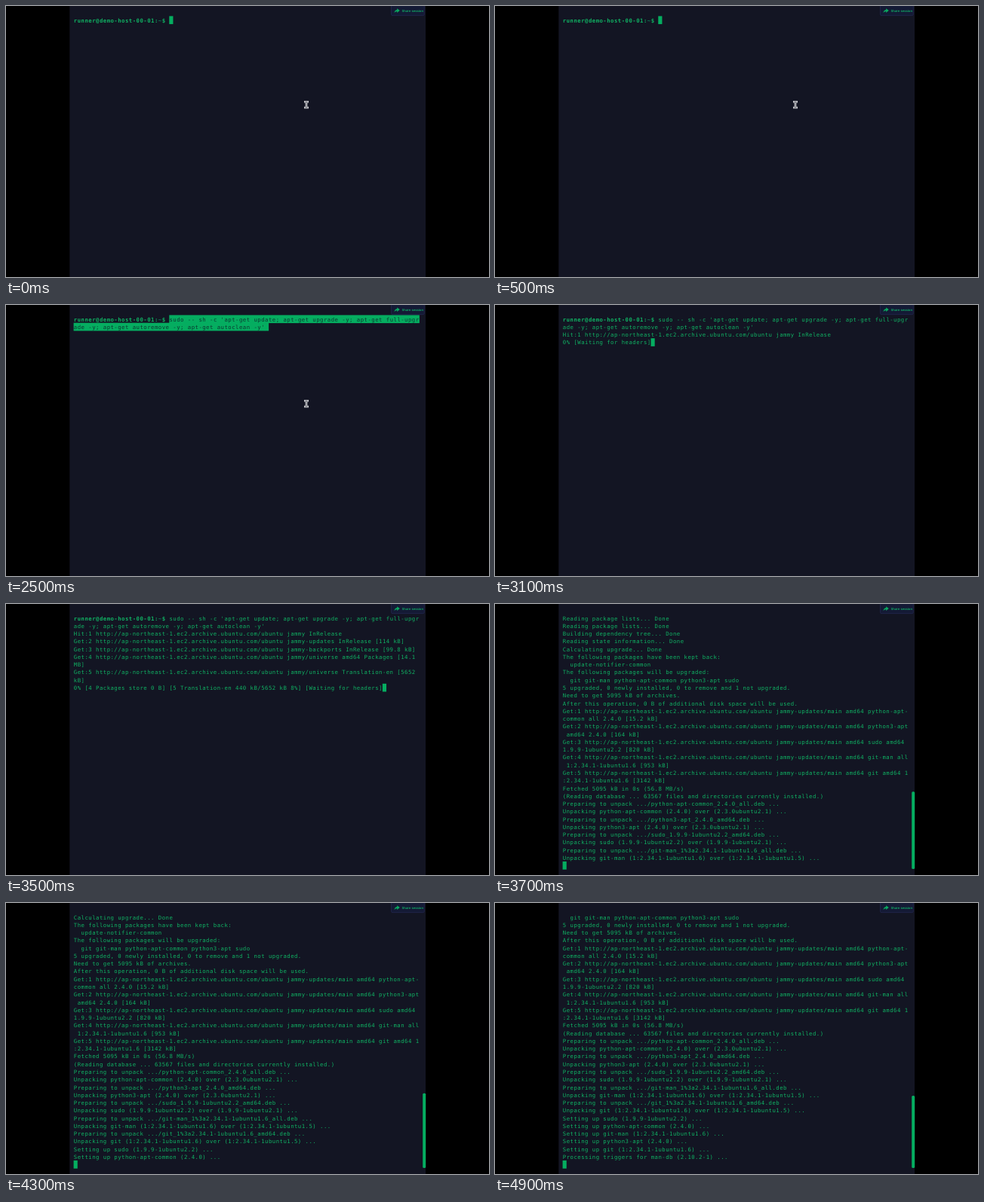
These frames come from a looping animation (640x360 px, 5000 ms). An HTML page:

```html
<!DOCTYPE html>
<html lang="en">
<head>
<meta charset="utf-8">
<title>Terminal update</title>
<style>
html, body { margin: 0; width: 100%; height: 100%; overflow: hidden; background: #000; }
svg { display: block; width: 100vw; height: 100vh; text-rendering: geometricPrecision; }
#rows text { font: 7.3px "DejaVu Sans Mono", "Noto Sans Mono", monospace; letter-spacing: 0.477px; white-space: pre; fill: #10b163; }
#rows .prompt { font-weight: 700; }
#rows .path { fill: #118059; }
#rows .picked { fill: #0b3a31; }
.green { fill: #05ad60; }
.label { font: 600 4.2px Inter, "Open Sans", sans-serif; fill: #10ae66; }
</style>
</head>
<body>
<svg viewBox="0 0 640 360" xmlns="http://www.w3.org/2000/svg">
  <rect width="640" height="360" fill="#000"/>
  <rect x="84.3" width="471.7" height="360" fill="#131523"/>
  <g id="marks" class="green"></g>
  <g id="rows"></g>
  <rect id="thumb" class="green" x="552.2" width="4" rx="1.5"/>
  <g>
    <rect id="button" x="510.5" y="-2" width="43.7" height="14.6" rx="1.5" fill="#141a35" stroke="#222850" stroke-width="0.8"/>
    <path d="M518.2 3.2 L521.8 6.1 L518.2 9 V7.3 C516.5 7.2 515.4 7.9 514.6 9.3 C514.7 6.8 516 5.1 518.2 4.9 Z" fill="#0aa860"/>
    <text class="label" x="524.6" y="8">Share session</text>
  </g>
  <g id="mouse" fill="none">
    <path d="M395 127.2 H401 M398 127 V135 M395 135 H401" stroke="#e4e4e8" stroke-width="2.6"/>
    <path d="M395.6 127.2 H400.4 M398 127 V135 M395.6 135 H400.4" stroke="#30313c" stroke-width="0.7"/>
  </g>
</svg>
<script>
const LOOP = 5000, COLS = 94, VISIBLE = 33;
const LEFT = 89.6, TOP = 13.6, CELL = 4.872, PITCH = 10.27, BOTTOM = 352;
const el = id => document.getElementById(id);

const user = "runner@demo-host-00-01";
const prompt = user + ":~$ ";
const command = "sudo -- sh -c 'apt-get update; apt-get upgrade -y; apt-get full-upgrade -y; apt-get autoremove -y; apt-get autoclean -y'";
const mirror = "http://ap-northeast-1.ec2.archive.ubuntu.com/ubuntu ";

// Terminal buffer, hard-wrapped at the window width
const buffer = [];
function add(line) {
  for (let i = 0; i < line.length; i += COLS) buffer.push(line.slice(i, i + COLS));
}
const get = (n, rest) => add(`Get:${n} ${mirror}${rest}`);

add(prompt + command);
add(`Hit:1 ${mirror}jammy InRelease`);
get(2, "jammy-updates InRelease [114 kB]");
get(3, "jammy-backports InRelease [99.8 kB]");
get(4, "jammy/universe amd64 Packages [14.1 MB]");
get(5, "jammy/universe Translation-en [5652 kB]");

const suites = ["jammy", "jammy-updates", "jammy-backports"];
const parts = ["multiverse", "main", "universe", "restricted"];
const kinds = ["amd64 Packages", "Translation-en", "amd64 c-n-f Metadata"];
for (let i = 0; buffer.length < 79; i++) {
  const suite = suites[Math.floor(i / 12) % 3], part = parts[Math.floor(i / 3) % 4];
  get(i + 6, `${suite}/${part} ${kinds[i % 3]} [${120 + i * 137 % 860} kB]`);
}
buffer.length = 79;
add("Fetched 26.3 MB in 5s (5412 kB/s)");

`Reading package lists... Done
Reading package lists... Done
Building dependency tree... Done
Reading state information... Done
Calculating upgrade... Done
The following packages have been kept back:
  update-notifier-common
The following packages will be upgraded:
  git git-man python-apt-common python3-apt sudo
5 upgraded, 0 newly installed, 0 to remove and 1 not upgraded.
Need to get 5095 kB of archives.
After this operation, 0 B of additional disk space will be used.`.split("\n").forEach(add);

["python-apt-common all 2.4.0 [15.2 kB]", "python3-apt amd64 2.4.0 [164 kB]",
 "sudo amd64 1.9.9-1ubuntu2.2 [820 kB]", "git-man all 1:2.34.1-1ubuntu1.6 [953 kB]",
 "git amd64 1:2.34.1-1ubuntu1.6 [3142 kB]"
].forEach((pkg, i) => get(i + 1, "jammy-updates/main amd64 " + pkg));

add("Fetched 5095 kB in 0s (56.8 MB/s)");
add("(Reading database ... 63567 files and directories currently installed.)");

const packages = {
  "python-apt-common": ["2.4.0", "2.3.0ubuntu2.1", "all"],
  "python3-apt": ["2.4.0", "2.3.0ubuntu2.1", "amd64"],
  "sudo": ["1.9.9-1ubuntu2.2", "1.9.9-1ubuntu2.1", "amd64"],
  "git-man": ["1:2.34.1-1ubuntu1.6", "1:2.34.1-1ubuntu1.5", "all"],
  "git": ["1:2.34.1-1ubuntu1.6", "1:2.34.1-1ubuntu1.5", "amd64"]
};
for (const [name, [next, old, arch]] of Object.entries(packages)) {
  add(`Preparing to unpack .../${name}_${next.replace(":", "%3a")}_${arch}.deb ...`);
  add(`Unpacking ${name} (${next}) over (${old}) ...`);
}
for (const name of ["sudo", "python-apt-common", "git-man", "python3-apt", "git"])
  add(`Setting up ${name} (${packages[name][0]}) ...`);
add("Processing triggers for man-db (2.10.2-1) ...");

// [start ms, finished buffer rows, unfinished last row]
const steps = [
  [0, 0, prompt],
  [1700, 1, buffer[1]],
  [2600, 2, ""],
  [2800, 2, "0% [Working]"],
  [3000, 3, "0% [Waiting for headers]"],
  [3200, 5, "0% [Waiting for headers]"],
  [3300, 7, "0% [4 Packages store 0 B] [Waiting for headers]"],
  [3400, 9, "0% [4 Packages store 0 B] [5 Translation-en 16.4 kB/5652 kB 0%] [Waiting for headers]"],
  [3500, 9, "0% [4 Packages store 0 B] [5 Translation-en 440 kB/5652 kB 8%] [Waiting for headers]"],
  [3600, 82, ""],
  [3700, 112, ""],
  [3800, 113, ""],
  [3900, 114, ""],
  [4200, 115, ""],
  [4300, 116, ""],
  [4400, 117, ""],
  [4500, 118, ""],
  [4600, 119, ""],
  [4700, 120, ""]
];

const rowTop = r => TOP + r * PITCH;
const block = (row, from, to) =>
  `<rect x="${LEFT + from * CELL}" y="${rowTop(row) - 0.2}" width="${(to - from) * CELL + 0.3}" height="${PITCH + 0.4}"/>`;

function rowText(line, row, isPrompt, picked) {
  let body = line;
  if (isPrompt) {
    const rest = line.slice(prompt.length);
    body = `<tspan class="prompt">${user}:<tspan class="path">~</tspan>$ </tspan>` +
      `<tspan${picked ? ' class="picked"' : ""}>${rest}</tspan>`;
  }
  const style = picked && !isPrompt ? ' class="picked"' : "";
  return `<text${style} x="${LEFT + 0.2}" y="${rowTop(row) + 8}">${body}</text>`;
}

function draw(step) {
  const [start, done, tail] = step;
  const picked = start === 1700;
  const total = done + 1;
  const first = Math.max(0, total - VISIBLE);
  const lines = buffer.slice(first, done).concat(tail);
  const last = lines.length - 1;

  el("rows").innerHTML = lines.map((line, r) => rowText(line, r, first + r === 0, picked)).join("");
  el("marks").innerHTML = block(last, tail.length, tail.length + 1) +
    (picked ? block(0, prompt.length, COLS) + block(1, 0, tail.length) : "");

  const height = first ? VISIBLE / total * BOTTOM : 0;
  el("thumb").setAttribute("y", BOTTOM - height);
  el("thumb").setAttribute("height", height);
  el("mouse").style.display = start < 2600 ? "" : "none";
}

let shown = null;
function frame() {
  const t = performance.now() % LOOP;
  const step = steps.findLast(s => s[0] <= t);
  if (step !== shown) draw(shown = step);
  requestAnimationFrame(frame);
}
frame();
</script>
</body>
</html>
```
